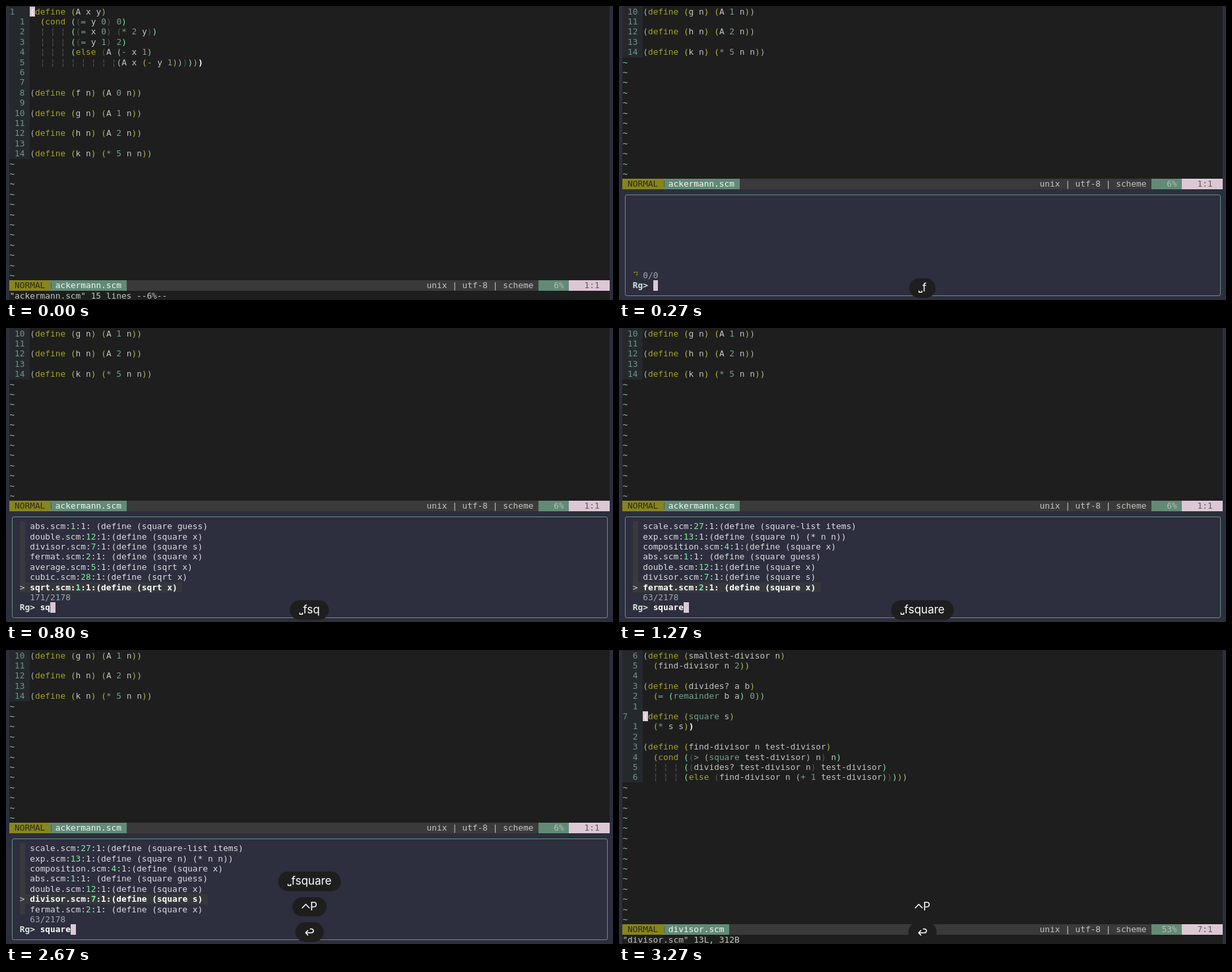
Write an HTML page that moves like this. It is 920x446 px and loops after 4670 ms.

```html
<!DOCTYPE html>
<html lang="en">
<head>
<meta charset="utf-8">
<title>Searching Scheme files</title>
<style>
html, body { margin: 0; width: 100%; height: 100%; overflow: hidden; background: #2d2e3e; }
#stage { position: relative; width: 920px; height: 446px; overflow: hidden; background: #2d2e3e;
  font: 12.8px/15.4px "DejaVu Sans Mono", monospace; color: #c2c5c0; }
#stage div { position: absolute; white-space: pre; }
i { font-style: normal; }
.editor { left: 5.4px; top: 0; width: 909.8px; overflow: hidden; background: #1e1e1e; }
.row { height: 15.4px; }
.num { color: #6f9484; background: #25292d; }
.cur { color: #6c8a88; }
.tilde { color: #93bfae; }
.kw { color: #a3a02c; }
.fn { color: #74a08a; }
.p1 { color: #a9b5a9; }
.p2 { color: #b5b13c; }
.p3 { color: #7fe3a4; }
.p0 { color: #505452; }
.bar { color: #55595a; }
.match { color: #fff; font-weight: bold; }
.cursor { background: #dcc8d4; color: #fff; }
.status { background: #3a3a3a; color: #b4b6b4; }
.mode { background: #87851c; color: #2b2b18; }
.file { background: #628a76; color: #f4f6f4; }
.pct { background: #628a76; color: #b6bdb6; }
.pos { background: #dcc8d4; color: #5f5a60; }
.box { box-sizing: border-box; left: 9.3px; top: 285.8px; width: 902.6px; height: 154.4px;
  border: 1px solid #5f9580; border-radius: 3px; }
.hit { color: #dcdde0; }
.hit .ln { color: #7ff0a0; }
.gut { background: #383a3e; color: #dcc8d4; }
.sel { background: #36373a; color: #fff; font-weight: bold; }
.count { color: #a2a6ae; }
.spin { color: #a3a02c; }
.prompt { color: #d4e6dc; font-weight: bold; }
.query { color: #fff; font-weight: bold; }
#stage .pill { left: 460px; height: 29.5px; border-radius: 15px; padding: 0 14px; transform: translateX(-50%);
  background: #1e1e1e; color: #fff; display: flex; align-items: center;
  font: 17px/29.5px Inter, sans-serif; }
.pill svg { fill: none; stroke: #fff; stroke-width: 1.5; stroke-linecap: round; stroke-linejoin: round; }
</style>
</head>
<body>
<div id="stage"></div>
<script>
const LOOP = 4670, CW = 7.71, RH = 15.4, X0 = 5.4, Y0 = 0.6;
const stage = document.getElementById('stage');

const buffers = [{
  name: 'ackermann.scm', line: 0, pct: '6%', pos: '1:1', msg: '"ackermann.scm" 15 lines --6%--',
  code: `(define (A x y)
  (cond ((= y 0) 0)
  ¦ ¦ ¦ ((= x 0) (* 2 y))
  ¦ ¦ ¦ ((= y 1) 2)
  ¦ ¦ ¦ (else (A (- x 1)
  ¦ ¦ ¦ ¦ ¦ ¦ ¦ ¦(A x (- y 1))))))


(define (f n) (A 0 n))

(define (g n) (A 1 n))

(define (h n) (A 2 n))

(define (k n) (* 5 n n))`
}, {
  name: 'divisor.scm', line: 6, pct: '53%', pos: '7:1', msg: '"divisor.scm" 13L, 312B',
  code: `(define (smallest-divisor n)
  (find-divisor n 2))

(define (divides? a b)
  (= (remainder b a) 0))

(define (square s)
  (* s s))

(define (find-divisor n test-divisor)
  (cond ((> (square test-divisor) n) n)
  ¦ ¦ ¦ ((divides? test-divisor n) test-divisor)
  ¦ ¦ ¦ (else (find-divisor n (+ 1 test-divisor)))))`
}];

const lists = {
  all: `tree.scm:31:1:
tree.scm:30:3:        (else (append (fringe (car items)) (fringe (cdr items))))
tree.scm:29:3:        ((not (pair? items)) (list items))
tree.scm:28:3:  (cond ((null? items) items)
tree.scm:27:1:(define (fringe items)
abs.scm:2:3:  (* guess guess))
abs.scm:1:1: (define (square guess)`,
  s: `exp.scm:13:1:(define (square n) (* n n))
abs.scm:1:1: (define (square guess)
double.scm:12:1:(define (square x)
divisor.scm:7:1:(define (square s)
scale.scm:3:1:(define (scale s)
cubic.scm:28:1:(define (sqrt x)
sqrt.scm:1:1:(define (sqrt x)`,
  sq: `abs.scm:1:1: (define (square guess)
double.scm:12:1:(define (square x)
divisor.scm:7:1:(define (square s)
fermat.scm:2:1: (define (square x)
average.scm:5:1:(define (sqrt x)
cubic.scm:28:1:(define (sqrt x)
sqrt.scm:1:1:(define (sqrt x)`,
  square: `scale.scm:27:1:(define (square-list items)
exp.scm:13:1:(define (square n) (* n n))
composition.scm:4:1:(define (square x)
abs.scm:1:1: (define (square guess)
double.scm:12:1:(define (square x)
divisor.scm:7:1:(define (square s)
fermat.scm:2:1: (define (square x)`
};

// Each step changes only the listed parts of the state.
const steps = [
  [0, { buf: 0, open: false, keys: [], query: '', list: '', count: '0/0', sel: 6 }],
  [70, { keys: ['_'] }],
  [200, { keys: ['_f'], open: true }],
  [270, { spin: true }],
  [330, { spin: false, list: 'all', count: '2178/2178' }],
  [530, { query: 's', keys: ['_fs'] }],
  [600, { list: 's', count: '1391/2178' }],
  [730, { query: 'sq', keys: ['_fsq'] }],
  [800, { list: 'sq', count: '171/2178' }],
  [870, { query: 'squ', keys: ['_fsqu'] }],
  [1000, { query: 'squa', keys: ['_fsqua'], list: 'square', count: '66/2178' }],
  [1070, { query: 'squar', keys: ['_fsquar'], count: '64/2178' }],
  [1200, { query: 'square', keys: ['_fsquare'] }],
  [1270, { count: '63/2178' }],
  [1930, { keys: ['_fsquare', '^P'] }],
  [2000, { sel: 5 }],
  [2670, { keys: ['_fsquare', '^P', '<'] }],
  [2730, { buf: 1, open: false }],
  [3270, { keys: ['^P', '<'] }]
];
let last = {};
const states = steps.map(([at, change]) => (last = { ...last, ...change, at }));

const esc = s => s.replace(/&/g, '&amp;').replace(/</g, '&lt;').replace(/>/g, '&gt;');
const span = (cls, s) => `<i class="${cls}">${esc(s)}</i>`;
const cell = (col, row, html, cls = '', cols = 0) =>
  `<div class="row ${cls}" style="left:${col * CW}px;top:${Y0 + row * RH}px;${cols ? `width:${cols * CW}px` : ''}">${html}</div>`;

function wordClass(w) {
  if (/^(define|cond|else)$/.test(w)) return 'kw';
  if (/^([-=*+>]|\d+|remainder|square)$/.test(w)) return 'fn';
  return w === '¦' ? 'bar' : '';
}

function highlight(lines, cursorLine) {
  let depth = 0, inForm = false;
  return lines.map((text, n) => text.replace(/[()]|[^\s()]+/g, (tok, at) => {
    if (tok === '(') {
      depth++;
      if (n === cursorLine && at === 0) { inForm = true; return span('cursor', tok); }
      return span('p' + depth % 4, tok);
    }
    if (tok === ')') {
      const cls = 'p' + depth-- % 4;
      if (depth === 0 && inForm) { inForm = false; return span('match', tok); }
      return span(cls, tok);
    }
    return span(wordClass(tok), tok);
  }));
}

function editor(buf, open) {
  const b = buffers[buf], up = open ? 10 : 0;
  const lines = highlight(b.code.split('\n'), b.line);
  let out = '';
  for (let r = 0; r < 27; r++) {
    const y = r - up;
    if (r >= lines.length) { out += cell(0, y, '~', 'tilde'); continue; }
    const here = r === b.line;
    const num = here ? String(r + 1) : String(Math.abs(r - b.line)).padStart(3);
    out += cell(0, y, num, here ? 'num cur' : 'num', 4) + cell(4, y, lines[r]);
  }
  const y = 27 - up;
  out += cell(0, y, '', 'status', 118) + cell(0, y, ' NORMAL', 'mode', 8)
    + cell(8, y, ' ' + b.name, 'file', b.name.length + 2)
    + `<div style="left:62.4px;top:${Y0 + y * RH + 3}px;width:1px;height:10px;background:#55601f"></div>`
    + cell(82, y, 'unix | utf-8 | scheme')
    + cell(104, y, b.pct.padStart(5), 'pct', 6) + cell(110, y, '   ' + b.pos, 'pos', 8)
    + cell(0, y + 1, b.msg);
  const height = open ? Y0 + 18 * RH : 446;
  return `<div class="editor" style="height:${height}px">${out}</div>`;
}

function finder(s) {
  let out = '';
  if (s.list) lists[s.list].split('\n').forEach((text, i) => {
    const html = esc(text).replace(/:(\d+):/, ':<i class="ln">$1</i>:');
    const on = i === s.sel, row = 19 + i;
    out += cell(2, row, on ? '&gt;' : '', 'gut', 1)
      + (on ? cell(3, row, ` ${html} `, 'hit sel') : cell(4, row, html, 'hit'));
  });
  if (s.spin) out += cell(2, 26, '⠙', 'spin');
  out += cell(4, 26, s.count, 'count') + cell(2, 27, 'Rg&gt;', 'prompt')
    + cell(6, 27, s.query, 'query') + cell(6 + s.query.length, 27, '', 'cursor', 1);
  return `<div class="box"></div><div style="left:${X0}px;top:0">${out}</div>`;
}

const icon = (w, d) => `<svg width="${w}" height="20" viewBox="0 0 ${w} 20"><path d="${d}"/></svg>`;
const glyphs = {
  '_': icon(6, 'M.8 14.2V16.2H5.2V14.2'),
  '^': icon(13, 'M1 11.2L6.3 5.8L11.6 11.2'),
  '<': icon(15, 'M5 7.6L1.6 11L5 14.4M1.6 11H10.6a2.9 2.9 0 0 0 0-5.8H8.6')
};

function pills(keys) {
  return keys.map((key, i) => {
    const y = 413.4 - (keys.length - 1 - i) * 38.5;
    return `<div class="pill" style="top:${y}px">${glyphs[key[0]]}<span>${key.slice(1)}</span></div>`;
  }).join('');
}

let shown = null;
const start = performance.now();
function tick() {
  const t = (performance.now() - start) % LOOP;
  const s = states.findLast(x => x.at <= t);
  if (s !== shown) {
    shown = s;
    stage.innerHTML = editor(s.buf, s.open) + (s.open ? finder(s) : '') + pills(s.keys);
  }
  requestAnimationFrame(tick);
}
tick();
</script>
</body>
</html>
```
